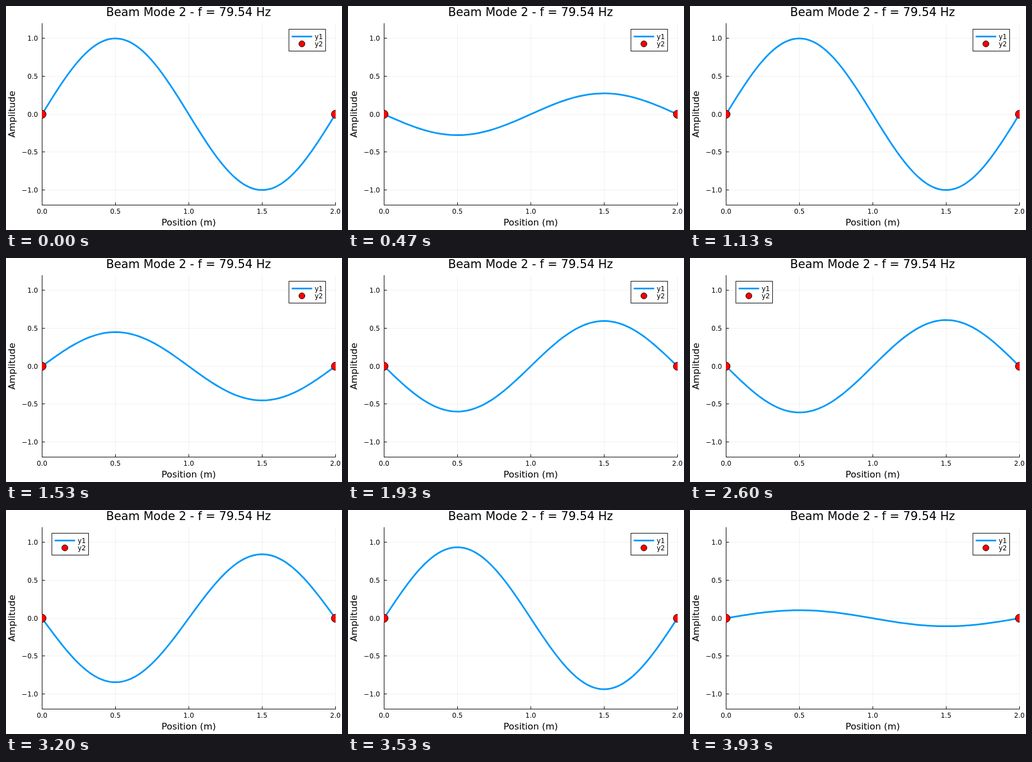
Write an HTML page with a canvas that moves like this. It is 600x400 px and loops after 3990 ms.

```html
<!DOCTYPE html>
<html lang="en">
<head>
<meta charset="utf-8">
<title>Beam mode</title>
<style>
  html, body { margin: 0; width: 100%; height: 100%; overflow: hidden; background: #fff; }
  canvas { display: block; width: 600px; height: 400px; }
</style>
</head>
<body>
<canvas id="stage" width="600" height="400"></canvas>
<script>
const canvas = document.getElementById('stage');
const ratio = window.devicePixelRatio || 1;
canvas.width = 600 * ratio;
canvas.height = 400 * ratio;
const ctx = canvas.getContext('2d');
ctx.scale(ratio, ratio);

const LOOP = 3990;
const LEFT = 64.4, RIGHT = 588.2, TOP = 30.9, BOTTOM = 355.7;
const BLUE = '#009afa';
const px = x => LEFT + x / 2 * (RIGHT - LEFT);
const py = y => (TOP + BOTTOM) / 2 - y * 135.33;

// Simply supported beam: second natural frequency in Hz
const freq = Math.PI / 2 * Math.sqrt(200e9 * 1e-6 / (7800 * 0.01));
const amplitude = step => Math.cos(2 * Math.PI * freq * step * 2 * Math.PI / 59);

function line(x1, y1, x2, y2, color, width) {
  ctx.strokeStyle = color;
  ctx.lineWidth = width;
  ctx.beginPath();
  ctx.moveTo(x1, y1);
  ctx.lineTo(x2, y2);
  ctx.stroke();
}

function text(str, x, y, size, align) {
  ctx.font = size + 'px "DejaVu Sans", sans-serif';
  ctx.textAlign = align;
  ctx.fillStyle = '#000';
  ctx.fillText(str, x, y);
}

function dot(x, y, r) {
  ctx.beginPath();
  ctx.arc(x, y, r, 0, 2 * Math.PI);
  ctx.fillStyle = '#f00';
  ctx.fill();
  ctx.strokeStyle = '#000';
  ctx.lineWidth = 1;
  ctx.stroke();
}

function drawAxes() {
  const xs = [0, 0.5, 1, 1.5, 2], ys = [-1, -0.5, 0, 0.5, 1];
  const snap = v => Math.floor(v) + 0.5;
  const grid = 'rgba(0,0,0,0.06)';
  xs.forEach(x => line(snap(px(x)), TOP, snap(px(x)), BOTTOM, grid, 1));
  ys.forEach(y => line(LEFT, snap(py(y)), RIGHT, snap(py(y)), grid, 1));

  line(64, 355.5, 588.7, 355.5, '#000', 1);
  line(64.5, 30.7, 64.5, 356, '#000', 1);
  xs.forEach(x => {
    line(snap(px(x)), 355.5, snap(px(x)), 350.5, '#000', 1);
    text(x.toFixed(1), px(x), 371.3, 11.86, 'center');
  });
  ys.forEach(y => {
    line(64.5, snap(py(y)), 69.5, snap(py(y)), '#000', 1);
    text(y.toFixed(1).replace('-', '\u2212'), 57, py(y) + 4.4, 11.86, 'right');
  });

  text('Beam Mode 2 - f = 79.54 Hz', 326, 18.3, 20.8, 'center');
  text('Position (m)', 326.3, 392, 16.3, 'center');
  ctx.save();
  ctx.translate(16, 193.3);
  ctx.rotate(-Math.PI / 2);
  text('Amplitude', 0, 0, 16.3, 'center');
  ctx.restore();
}

function drawBeam(a) {
  ctx.save();
  ctx.beginPath();
  ctx.rect(64, 30, 524.6, 326);
  ctx.clip();
  ctx.strokeStyle = BLUE;
  ctx.lineWidth = 3;
  ctx.lineJoin = 'round';
  ctx.beginPath();
  for (let i = 0; i < 100; i++) {
    const x = 2 * i / 99;
    ctx.lineTo(px(x), py(a * Math.sin(Math.PI * x)));
  }
  ctx.stroke();
  dot(px(0), py(0), 7.2);
  dot(px(2), py(0), 7.2);
  ctx.restore();
}

function drawLegend(x) {
  ctx.fillStyle = '#fff';
  ctx.fillRect(x, 41.5, 65.5, 39);
  ctx.strokeStyle = '#000';
  ctx.lineWidth = 1;
  ctx.strokeRect(x, 41.5, 65.5, 39);
  line(x + 5, 54.5, x + 41.5, 54.5, BLUE, 3);
  dot(x + 23.2, 67.6, 5.4);
  text('y1', x + 46, 58.7, 11.86, 'left');
  text('y2', x + 46, 71.8, 11.86, 'left');
}

function draw(ms) {
  // Fifteen steps a second, each starting on a hundredth
  const step = Math.floor((Math.floor(ms / 10) + 0.5) * 3 / 20);
  const a = amplitude(step);
  ctx.fillStyle = '#fff';
  ctx.fillRect(0, 0, 600, 400);
  drawAxes();
  drawBeam(a);
  // The legend moves left when the crest enters the top right corner
  drawLegend(a < -0.601 ? 81.9 : 505.2);
}

let start;
function tick(now) {
  if (start === undefined) start = now;
  draw(Math.max(0, now - start) % LOOP);
  requestAnimationFrame(tick);
}
draw(0);
requestAnimationFrame(tick);
</script>
</body>
</html>
```
